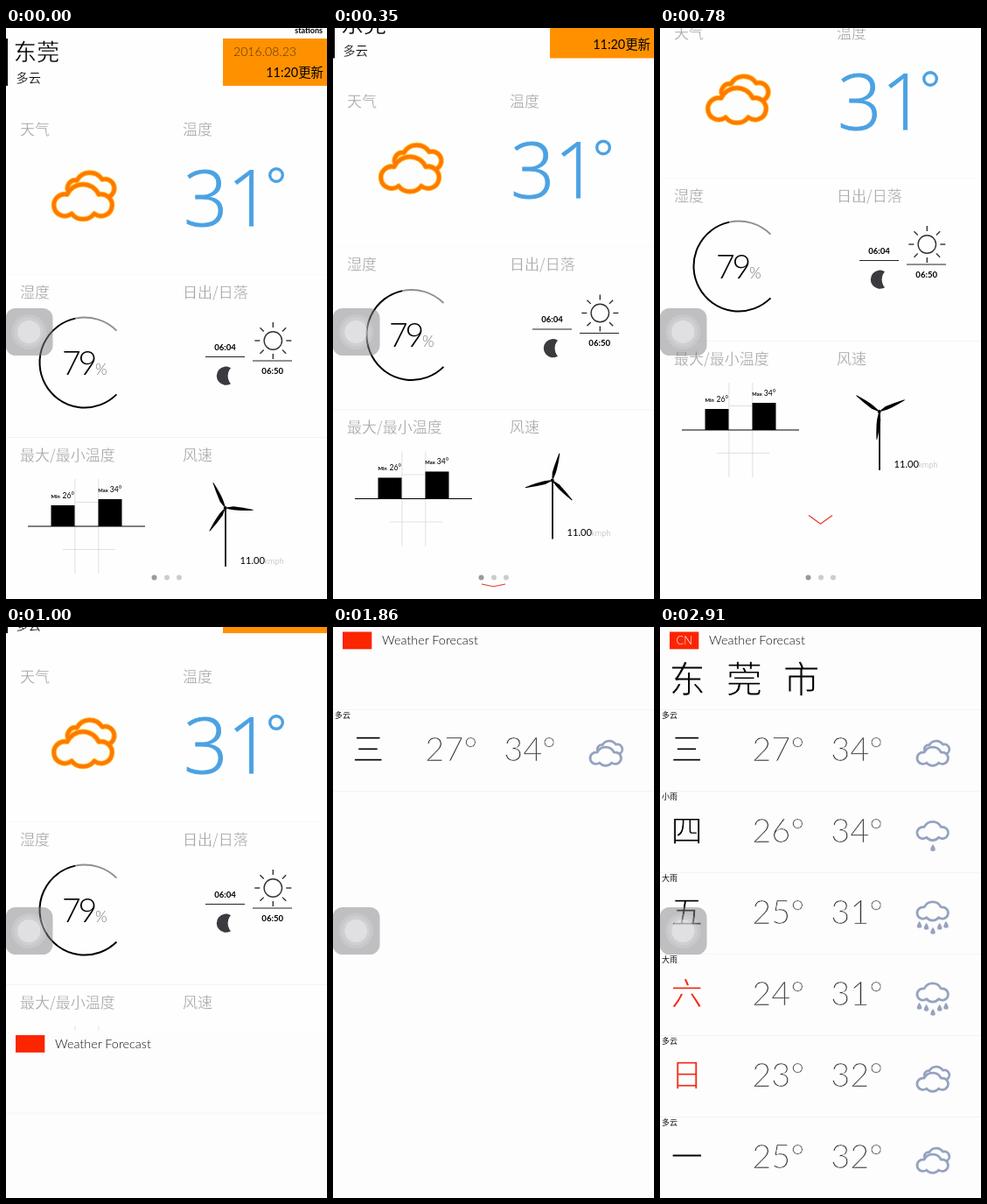
Animation, 367 px wide and 652 px high, one loop 3.84 s. Source, as an HTML page:

```html
<!DOCTYPE html>
<html lang="zh-CN">
<head>
<meta charset="utf-8">
<title>Weather</title>
<style>
  html, body { margin: 0; width: 100%; height: 100%; overflow: hidden; background: #fefefe; }
  svg { display: block; width: 367px; height: 652px; }
  text { font-family: Lato, "Noto Sans CJK SC", "Noto Sans CJK", sans-serif; white-space: pre; }
  .zh { font-family: "Noto Sans CJK SC", "Noto Sans CJK", sans-serif; }
  .open { font-family: "Open Sans", sans-serif; }
</style>
</head>
<body>
<svg id="stage" viewBox="0 0 367 652"></svg>
<script>
const LOOP = 3840;
// The picture is refreshed only at these moments (ms).
const BEATS = [0, 90, 180, 260, 350, 440, 520, 610, 690, 780, 860, 950, 1030, 1110, 1170,
  1260, 1350, 1430, 1860, 1950, 2040, 2130, 2220, 2300, 2390, 2470, 2910];
const RELEASE = 835, PRESENT = 890, FIRST_ROW = 1860, ALL_ROWS = 1950;
const BLUE = '#4ba2e2', RED = '#fb2500', SLATE = '#95a3bf', PAPER = '#fdfdfd';

// thin: width of a paper-coloured outline that slims the strokes.
function text(x, y, size, str, { fill = '#000', weight = 400, anchor = 'start', cls = '', thin = 0 } = {}) {
  const slim = thin ? `stroke="${PAPER}" stroke-width="${thin}"` : '';
  return `<text x="${x}" y="${y}" font-size="${size}" font-weight="${weight}" fill="${fill}" text-anchor="${anchor}" class="${cls}" ${slim}>${str}</text>`;
}
const line = (x1, y1, x2, y2, color, w = 1) =>
  `<path d="M${x1} ${y1}L${x2} ${y2}" stroke="${color}" stroke-width="${w}"/>`;
const rect = (x, y, w, h, fill, extra = '') =>
  `<rect x="${x}" y="${y}" width="${w}" height="${h}" fill="${fill}" ${extra}/>`;
const circle = (x, y, r, attrs) => `<circle cx="${x}" cy="${y}" r="${r}" ${attrs}/>`;

const FRONT = 'M75 212A12.5 12.5 0 1 1 70 190A19.8 19.8 0 0 1 106 190A12.5 12.5 0 1 1 101 212A16.5 16.5 0 0 1 75 212Z';
const BACK = 'M72 188A9 9 0 0 1 81 174A16.8 16.8 0 0 1 110 173A10.6 10.6 0 0 1 117 193';

function cloud(color, width, both, fill = PAPER) {
  const shape = (d, f) => `<path d="${d}" fill="${f}" stroke="${color}" stroke-width="${width}" stroke-linejoin="round"/>`;
  return (both ? shape(BACK, 'none') : '') + shape(FRONT, fill);
}

function arc(cx, cy, r, from, to) {
  const at = deg => {
    const a = deg * Math.PI / 180;
    return `${cx + r * Math.cos(a)} ${cy + r * Math.sin(a)}`;
  };
  return `M${at(from)}A${r} ${r} 0 ${to - from > 180 ? 1 : 0} 1 ${at(to)}`;
}

function header() {
  return text(362, 5.5, 9, 'stations', { weight: 700, anchor: 'end' }) +
    rect(0, 12, 2, 54, '#000') +
    text(8.7, 36.7, 26.3, '东莞', { cls: 'zh', thin: .4 }) +
    text(11.5, 62.3, 14.2, '多云', { cls: 'zh', fill: '#111', thin: .2 }) +
    rect(248, 12, 119, 54, '#ff9100') +
    text(260, 32, 14.1, '2016.08.23', { weight: 300, fill: '#5c3400' }) +
    text(363, 56, 14.4, '11:20更新', { anchor: 'end' });
}

function titles() {
  const cells = [
    [16, 121.5, '天气'], [202, 121.5, '温度'], [16, 308, '湿度'],
    [202, 308, '日出/日落'], [16, 493.5, '最大/最小温度'], [202, 493.5, '风速']
  ];
  return cells.map(([x, y, s]) => text(x, y, 17, s, { cls: 'zh', fill: '#a6a6a6', thin: .3 })).join('');
}

function temperature() {
  const style = { fill: BLUE, weight: 300, cls: 'open' };
  return `<g stroke="${BLUE}" stroke-width=".9">${text(203, 226, 89, '3', style)}${text(253, 226, 89, '1', style)}</g>` +
    circle(309, 168, 7.3, `fill="none" stroke="${BLUE}" stroke-width="3.4"`);
}

function humidity() {
  const ring = (a, b, color) =>
    `<path d="${arc(90, 382, 51.5, a, b)}" fill="none" stroke="${color}" stroke-width="2"/>`;
  return ring(258, 315, '#8f8f8f') + ring(45, 258, '#000') +
    text(64, 396, 37.5, '7', { weight: 300 }) + text(82.5, 396, 37.5, '9', { weight: 300 }) +
    text(102, 396, 17.5, '%', { weight: 300, fill: '#777' });
}

function sunTimes() {
  let rays = '';
  for (let a = 0; a < 360; a += 45)
    rays += `<path d="M15 0H21" transform="translate(305.3 357) rotate(${a})" stroke="#333" stroke-width="1.4"/>`;
  return text(250.5, 368, 9.6, '06:04', { weight: 700, anchor: 'middle' }) +
    line(228, 375.5, 273, 375.5, '#222') +
    '<path d="M257 388.2A10.6 10.6 0 1 0 257 406.2A13.5 13.5 0 0 1 257 388.2Z" fill="#3a3a3f"/>' +
    rays + circle(305.3, 357, 10.2, 'fill="none" stroke="#333" stroke-width="1.4"') +
    line(282, 380, 327, 380, '#222') +
    text(304.7, 395, 9.6, '06:50', { weight: 700, anchor: 'middle' });
}

function range() {
  const guide = '#d9d9d9';
  return line(78.8, 515, 78.8, 623, guide, .8) + line(105.8, 515, 105.8, 623, guide, .8) +
    line(79, 541.5, 106, 541.5, guide, .8) + line(65, 595.5, 125, 595.5, guide, .8) +
    rect(51.5, 545, 27, 24, '#000') + rect(105.5, 538, 27, 31, '#000') +
    line(25, 569, 159, 569, '#000', 1.2) +
    text(51.5, 537, 5.8, 'Min', { weight: 700 }) + text(64.5, 537, 8.6, '26°') +
    text(105.3, 530, 5.8, 'Max', { weight: 700 }) + text(118.7, 530, 8.6, '34°');
}

function wind() {
  const blade = a => `<path d="M2 -.8L9 -2.2Q20 -1.8 32 0V.8Q18 2.4 9 1.8L2 .8Z" transform="rotate(${a})"/>`;
  return line(251, 549, 251, 615, '#000', 1.7) +
    `<g transform="translate(250.7 548)">${circle(0, 0, 2, '')}<g id="rotor">${[0, 120, 240].map(blade).join('')}</g></g>` +
    text(267.5, 612, 11.2, '11.00') +
    text(295.5, 612, 9.2, 'kmph', { weight: 300, fill: '#aaa' });
}

function drop(x, y) {
  return `<path d="M${x} ${y - 4.2}Q${x + 5.6} ${y + 3.8} ${x} ${y + 3.8}Q${x - 5.6} ${y + 3.8} ${x} ${y - 4.2}Z" fill="${SLATE}"/>`;
}

// Drops are placed relative to the first row.
const SKY = {
  '多云': { both: true, dy: 0, drops: [] },
  '小雨': { dy: -7.8, drops: [[312, 159.3]] },
  '大雨': { dy: -9.3, drops: [[296.5, 154], [304.5, 156], [312, 161], [319.7, 156], [327, 154]] }
};
const DAYS = [
  ['三', '多云', 27, 34], ['四', '小雨', 26, 34], ['五', '大雨', 25, 31],
  ['六', '大雨', 24, 31], ['日', '多云', 23, 32], ['一', '多云', 25, 32]
];

function row([day, sky, low, high], i) {
  const { both, dy, drops } = SKY[sky];
  const digits = { weight: 300, fill: '#333', thin: .6 };
  const dayFill = day === '六' || day === '日' ? '#f22a18' : '#000';
  return `<g class="row" transform="translate(0 ${i * 93})">` +
    text(2, 104.4, 9, sky, { cls: 'zh', fill: '#111' }) +
    `<g class="day">${text(30.7, 153.4, 36.4, day, { cls: 'zh', anchor: 'middle', fill: dayFill, thin: 1 })}</g>` +
    text(105.3, 153, 38, low + '°', digits) + text(195.2, 153, 38, high + '°', digits) +
    `<g transform="translate(264.8 ${42 + dy}) scale(.533)">${cloud(SLATE, 5.2, both)}</g>` +
    drops.map(d => drop(...d)).join('') +
    line(0, 187.5, 367, 187.5, '#f4f4f4') + '</g>';
}

function today() {
  const dots = [169.5, 184, 198].map((x, i) => circle(x, 627.5, 3, `fill="${i ? '#cdcdcd' : '#9a9a9a'}"`)).join('');
  return rect(0, 0, 367, 652, '#fefefe') + '<g id="scroll">' +
    line(0, 281.5, 367, 281.5, '#fafafa') + line(0, 467.5, 367, 467.5, '#f4f4f4') +
    header() + titles() + cloud('#ffb520', 6, true) + cloud('#ff7800', 4, true, 'none') +
    temperature() + humidity() + sunTimes() + range() + wind() +
    '<path id="chevron" fill="none" stroke="#e8352e" stroke-width="1.2"/></g>' + dots;
}

function forecast() {
  const name = [...'东莞市'].map((c, i) =>
    text(31.2 + 65.2 * i, 74.6, 41.8, c, { cls: 'zh', anchor: 'middle', thin: 1.1 })).join('');
  return '<g id="forecast">' + rect(0, 0, 367, 652, PAPER) +
    rect(11, 5.5, 33.3, 19.8, RED) +
    text(56, 20, 14.4, 'Weather Forecast', { weight: 300, fill: '#111' }) +
    line(0, 94.5, 367, 94.5, '#f4f4f4') +
    `<g id="city">${text(27.7, 20, 12.8, 'CN', { weight: 300, anchor: 'middle', fill: '#fff' })}${name}</g>` +
    DAYS.map(row).join('') + '</g>';
}

function touchButton() {
  return rect(-.5, 320, 54, 54, '#828084', 'rx="11.5" fill-opacity=".5"') +
    circle(26.3, 347, 20, 'fill="#fff" fill-opacity=".14"') +
    circle(26.3, 347, 16.5, 'fill="#fff" fill-opacity=".12"') +
    circle(26.3, 347, 13, 'fill="#fff" fill-opacity=".36"');
}

const stage = document.getElementById('stage');
stage.innerHTML = today() + forecast() + touchButton();
const get = id => document.getElementById(id);
const scroll = get('scroll'), chevron = get('chevron'), rotor = get('rotor');
const sheet = get('forecast'), city = get('city');
const rows = [...document.querySelectorAll('.row')], days = [...document.querySelectorAll('.day')];

const move = (el, x, y) => el.setAttribute('transform', `translate(${x.toFixed(2)} ${y.toFixed(2)})`);
const show = (el, on) => el.setAttribute('display', on ? 'inline' : 'none');
// Critically damped settling from 1 to 0.
const settle = (ms, rate) => {
  const x = Math.max(0, ms) / 1000 * rate;
  return (1 + x) * Math.exp(-x);
};
const pull = t => 110 * Math.pow(Math.max(0, Math.min(t, RELEASE) - 80) / 700, 1.312);

// Only the weekday of each row slides; its x offset lives on a wrapper.
function draw(t) {
  const up = pull(t) * settle(t - RELEASE, 15);
  move(scroll, 0, -up);
  chevron.setAttribute('d', `M170 666.5L183.5 ${666.5 + up * .088}L197 666.5`);
  rotor.setAttribute('transform', `rotate(${3.5 + t * .1165})`);

  show(sheet, t >= PRESENT);
  move(sheet, 0, t < 1430 ? 652 * settle(t - PRESENT, 18) : 0);

  const ready = t >= ALL_ROWS;
  show(city, ready);
  rows.forEach((r, i) => show(r, ready || (i === 0 && t >= FIRST_ROW)));
  const left = Math.max(0, Math.min(1, 1 - (t - FIRST_ROW) / 610));
  days.forEach(d => move(d, 9.5 * Math.pow(left, 1.28), 0));
}

function tick(now) {
  const t = now % LOOP;
  draw(BEATS.findLast(b => b <= t));
  requestAnimationFrame(tick);
}
draw(0);
requestAnimationFrame(tick);
</script>
</body>
</html>
```
